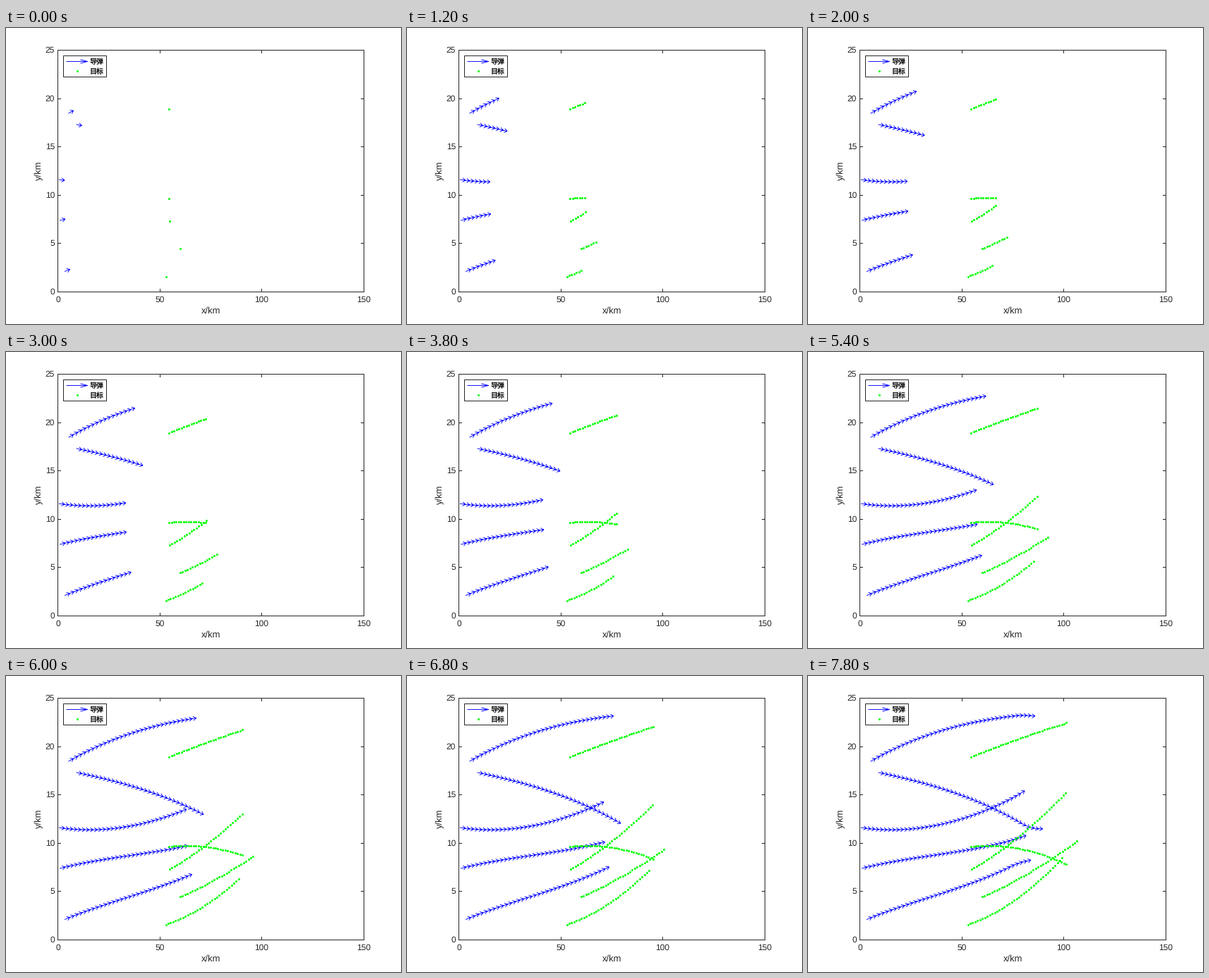
These frames come from a looping animation (560 px wide and 420 px high, 8000 ms). A matplotlib script:

```python
import numpy as np
import matplotlib.pyplot as plt
from matplotlib.animation import FuncAnimation
from matplotlib.patches import Rectangle

plt.rcParams["path.snap"] = False
plt.rcParams["text.hinting"] = "none"

W, H = 560, 420
FRAMES, STEP_MS = 40, 200
LEFT, RIGHT, TOP, BOTTOM = 73, 507, 31, 374
KM_X = (RIGHT - LEFT) / 150      # pixels per km
KM_Y = (BOTTOM - TOP) / 25
PT = 0.72                        # points per pixel at 100 dpi
AXIS, BLUE, GREEN = "#262626", "#0000ff", "#00ff00"
CRUISE, RUN = 70, 46.6           # km over which the heights are spread

# Start x, evenly spaced heights along the course, bend after the cruise (km).
MISSILES = [
    (5.2, (18.46, 20.81, 22.31, 23.15), -0.21),
    (9.0, (17.32, 16.14, 14.48, 12.08), 0.76),
    (0.5, (11.62, 11.46, 12.35, 14.22), 0.09),
    (0.87, (7.39, 8.37, 9.12, 10.10), 0.06),
    (3.28, (2.11, 3.89, 5.51, 7.52), -0.42),
]
TARGETS = [
    (54.6, (18.95, 20.81, 22.45)),
    (54.45, (9.66, 9.46, 7.84)),
    (54.8, (7.29, 10.76, 15.33)),
    (59.97, (4.45, 7.00, 10.26)),
    (52.9, (1.60, 4.18, 8.54)),
]


def px(x):
    return LEFT + x * KM_X


def py(y):
    return BOTTOM - y * KM_Y


def travel(x0, heights, span, speed, bend=0):
    """Rows of pixel x, pixel y and pixel slope at constant speed (km per step)."""
    nodes = np.linspace(0, span, len(heights))
    coef = np.polyfit(nodes, heights, len(heights) - 1)
    grade = np.polyder(coef)
    d, rows = 0.0, []
    for _ in range(FRAMES):
        late = max(0, d - span) / 10
        y = np.polyval(coef, d) + bend * late ** 2
        slope = np.polyval(grade, d) + bend * late / 5
        rows.append((px(x0 + d), py(y), -slope * KM_Y / KM_X))
        d += speed / np.hypot(1, slope)
    return np.array(rows)


def arrow(x, y, slope, length=8, head=4, half=2.9):
    d = np.array([1, slope]) / np.hypot(1, slope)
    n = np.array([-d[1], d[0]])
    tail = np.array([x, y])
    tip = tail + length * d
    back = tip - head * d
    gap = [np.nan, np.nan]
    return np.array([tail, tip, gap, back + half * n, tip, back - half * n, gap])


fig = plt.figure(figsize=(W / 100, H / 100), dpi=100, facecolor="white")
ax = fig.add_axes([0, 0, 1, 1])
# Whole numbers fall on pixel centres.
ax.set_xlim(-0.5, W - 0.5)
ax.set_ylim(H - 0.5, -0.5)
ax.axis("off")


def rule(xs, ys):
    ax.plot(xs, ys, color=AXIS, lw=PT, solid_capstyle="butt")


def label(x, y, text, size, **kw):
    style = dict(ha="center", va="center", color=AXIS, family="Liberation Sans")
    ax.text(x, y, text, fontsize=size * PT, **{**style, **kw})


def box(x0, y0, x1, y1, z):
    ax.add_patch(Rectangle((x0, y0), x1 - x0, y1 - y0, fc="white", ec=AXIS,
                           lw=PT, zorder=z))


box(LEFT, TOP, RIGHT, BOTTOM, 0)
for km in range(0, 151, 50):
    x = round(px(km))
    rule([x, x], [BOTTOM, BOTTOM - 4.5])
    rule([x, x], [TOP, TOP + 4.5])
    label(x, 385.5, str(km), 12)
for km in range(0, 26, 5):
    y = round(py(km))
    rule([LEFT, LEFT + 4.5], [y, y])
    rule([RIGHT, RIGHT - 4.5], [y, y])
    label(68.5, y, str(km), 12, ha="right")
label(290, 401.5, "x/km", 13)
label(46, 202, "y/km", 13, rotation=90)

arrow_style = dict(color=BLUE, lw=0.9 * PT, solid_capstyle="butt")
dot_style = dict(ls="none", marker="o", color=GREEN, ms=3 * PT, mew=0)

box(81, 39, 142, 69, 5)
ax.plot(*arrow(85, 47, 0, 30, 10, 2.6).T, zorder=6, **arrow_style)
ax.plot([100], [61], zorder=6, **dot_style)
for y, text in ((47.5, "导弹"), (61.5, "目标")):
    label(118, y, text, 10, ha="left", color="black",
          family="Noto Sans CJK JP", zorder=6)

arrows = [np.array([arrow(*row) for row in travel(x0, heights, CRUISE, 2, bend)])
          for x0, heights, bend in MISSILES]
dots = [travel(x0, heights, RUN, 1.2)[:, :2] for x0, heights in TARGETS]
arrow_lines = [ax.plot([], [], zorder=3, **arrow_style)[0] for _ in arrows]
dot_lines = [ax.plot([], [], zorder=3, **dot_style)[0] for _ in dots]


def update(k):
    for line, course in zip(arrow_lines + dot_lines, arrows + dots):
        line.set_data(*course[:k + 1].reshape(-1, 2).T)
    return arrow_lines + dot_lines


anim = FuncAnimation(fig, update, frames=FRAMES, interval=STEP_MS,
                     repeat=True, repeat_delay=0, blit=False)
plt.show()
```
